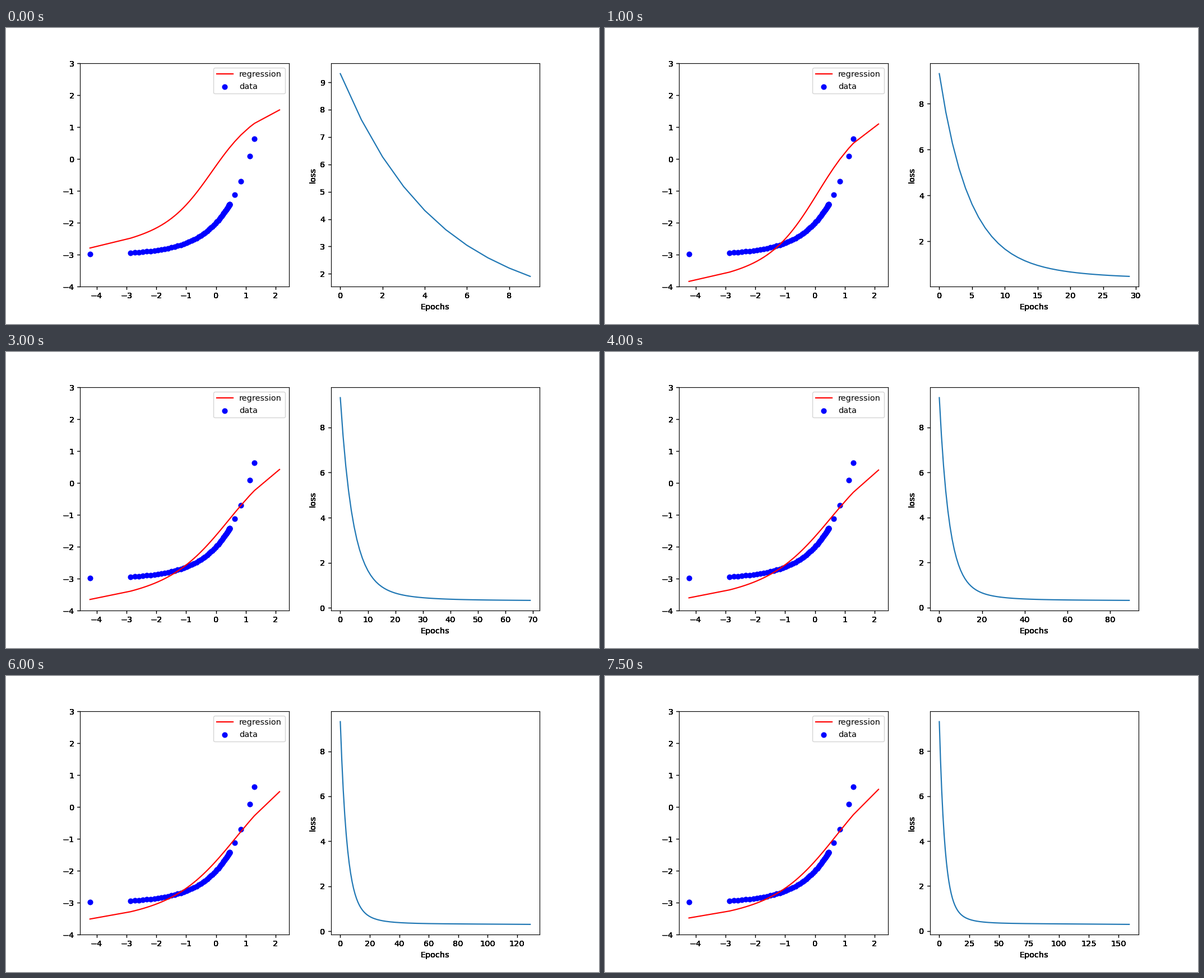
A matplotlib script that plays this animation: 1058 px wide and 529 px high, repeating every 8 s.

```python
import numpy as np
import matplotlib.pyplot as plt
from matplotlib.animation import FuncAnimation

WIDTH, HEIGHT, DPI = 1058, 529, 104
FRAMES, INTERVAL, STEP = 16, 500, 10

# A dense run of samples thinning out to the left, plus a few outliers
dense = 0.455 - 3.32 * np.linspace(0, 1, 52)**2.2
xs = np.sort(np.append(dense, [-4.22, 0.627, 0.834, 1.13, 1.29, 2.131]))
ys = np.exp(xs) - 3


def regression(epoch):
    """Fitted curve: a line plus one tanh unit that drifts while training."""
    height = -1.70 + 2.43 * np.exp(-epoch / 18.3)
    slope = 0.085 + 0.105 * np.exp(-epoch / 75)
    center = 0.85 - 1.12 * np.exp(-epoch / 72)
    steep = 0.5 + 0.19 * np.exp(-(epoch / 50)**2)
    s = (epoch - 11) / 18
    size = 1.75 + 0.0025 * epoch + 0.31 * s * np.exp(1 - s * s)
    bend = np.tanh(steep * (xs - center)) + np.tanh(steep * center)
    return height + slope * xs + size * bend


def loss(epoch):
    return (7.757 * 0.795**epoch + 1.2 * 0.92**epoch
            + 0.36 * np.exp(-epoch / 830))


def harden(img, dpi):
    """Strengthen the antialiased edges of ticks and labels."""
    img = img.copy()
    img[..., :3] = 0
    img[..., 3] = np.clip(img[..., 3] * 3, 0, 1)
    return img, 0, 0


# The small extra keeps the pixel size from rounding down
fig, (ax, ax_loss) = plt.subplots(
    1, 2, figsize=((WIDTH + 0.01) / DPI, (HEIGHT + 0.01) / DPI), dpi=DPI)
fig.subplots_adjust(left=0.125, right=0.9, bottom=67 / HEIGHT, top=0.88,
                    wspace=0.2)
for a in (ax, ax_loss):
    for axis in (a.xaxis, a.yaxis):
        axis.set_agg_filter(harden)

fit_line, = ax.plot(xs, regression(STEP - 1), color="red", label="regression")
ax.scatter(xs, ys, color="blue", label="data")
ax.set_xlim(-4.55, 2.449)
ax.set_ylim(-4, 3)
ax.legend(loc="upper right")

loss_line, = ax_loss.plot([], [])
ax_loss.set_xlabel("Epochs")
ax_loss.set_ylabel("loss")


def update(k):
    epochs = np.arange(STEP * (k + 1))
    fit_line.set_ydata(regression(epochs[-1]))
    loss_line.set_data(epochs, loss(epochs))
    ax_loss.relim()
    ax_loss.autoscale_view()
    return fit_line, loss_line


anim = FuncAnimation(fig, update, frames=FRAMES, interval=INTERVAL,
                     init_func=lambda: update(0), repeat=True, repeat_delay=0)
plt.show()
```
